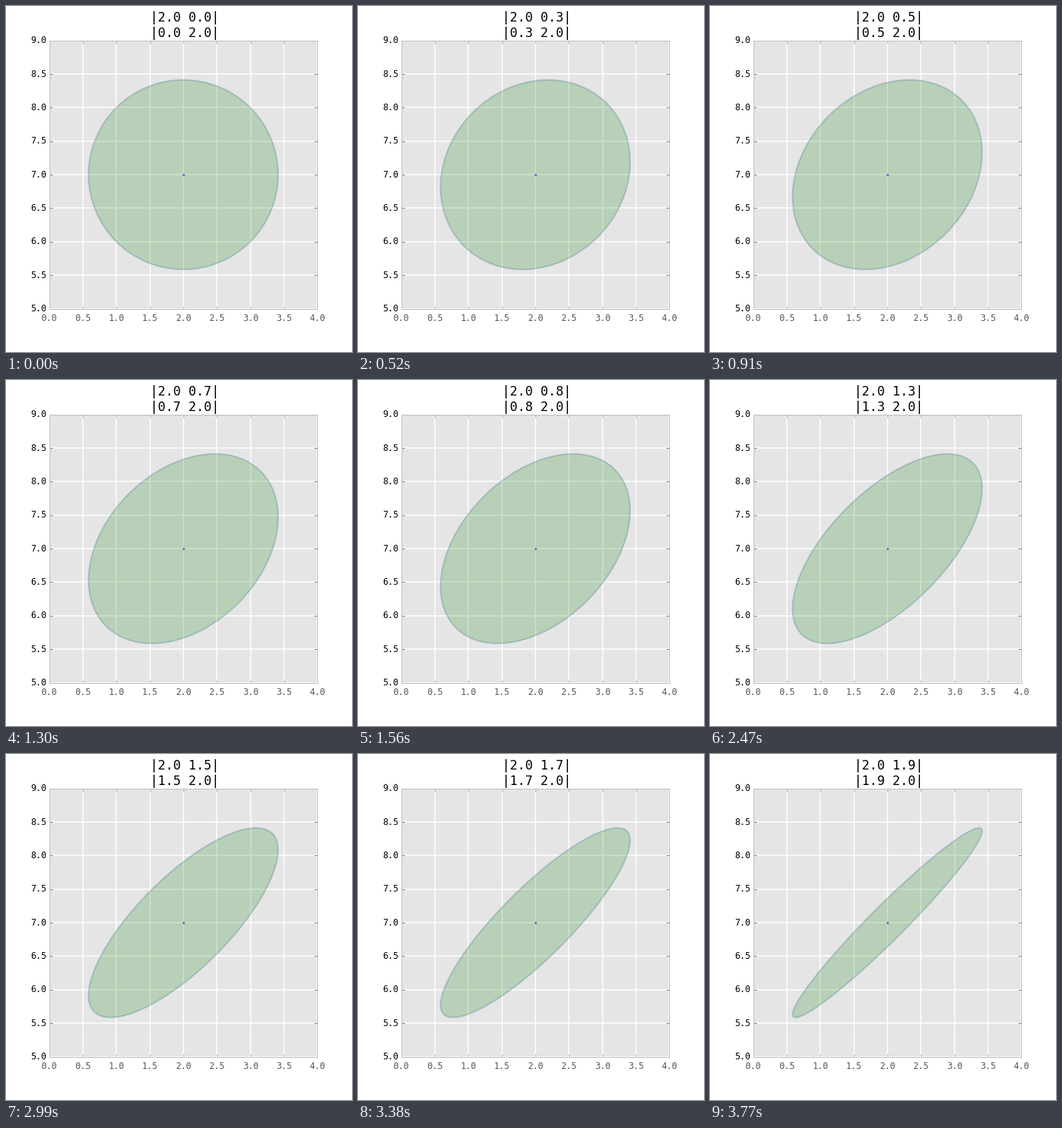
These frames come from a looping animation (468 px wide and 468 px high, 3900 ms). A matplotlib script:

```python
import matplotlib.pyplot as plt
import numpy as np
from matplotlib.animation import FuncAnimation
from matplotlib.patches import Ellipse

FRAMES, INTERVAL = 30, 130
VAR = 2.0
CENTER = (2, 7)

plt.rcParams.update({
    "font.family": "DejaVu Sans Mono",
    "font.size": 12,
    "axes.titlesize": "x-large",
    "axes.titlepad": 5,
    "axes.facecolor": "#e5e5e5",
    "axes.edgecolor": "#bcbcbc",
    "axes.linewidth": 1,
    "axes.axisbelow": True,
    "ytick.alignment": "center",
})

fig = plt.figure(figsize=(6.5, 6.5), dpi=72, facecolor="white")
ax = fig.add_axes([0.125, 0.125, 0.775, 0.775])
ax.set(xlim=(0, 4), ylim=(5, 9),
       xticks=np.arange(0, 4.1, 0.5), yticks=np.arange(5, 9.1, 0.5))
ax.xaxis.set_major_formatter("{x:.1f}")
ax.yaxis.set_major_formatter("{x:.1f}")
ax.grid(True, color="white", linestyle="-", linewidth=1.5)
ax.tick_params(direction="in", length=4, width=0.5, top=True, right=True)
ax.tick_params(axis="x", pad=6, color="#555555", labelcolor="#555555")
ax.tick_params(axis="y", pad=4, color="black", labelcolor="black")

ellipse = Ellipse(CENTER, 1, 1, angle=45, facecolor="green",
                  edgecolor="#004080", alpha=0.2, linewidth=2)
ax.add_patch(ellipse)
ax.scatter(*CENTER, s=20, marker="+", color="blue", linewidth=0.5)
title = ax.set_title("", x=0.5055, y=1)


def update(i):
    """Show the one-sigma ellipse as the covariance grows from 0 towards VAR."""
    cov = VAR * i / FRAMES
    ellipse.width = 2 * np.sqrt(VAR + cov)
    ellipse.height = 2 * np.sqrt(VAR - cov)
    title.set_text(f"|{VAR:.1f} {cov:.1f}|\n|{cov:.1f} {VAR:.1f}|")
    return ellipse, title


anim = FuncAnimation(fig, update, frames=FRAMES, interval=INTERVAL,
                     repeat=True, repeat_delay=0, blit=False)
plt.show()
```
